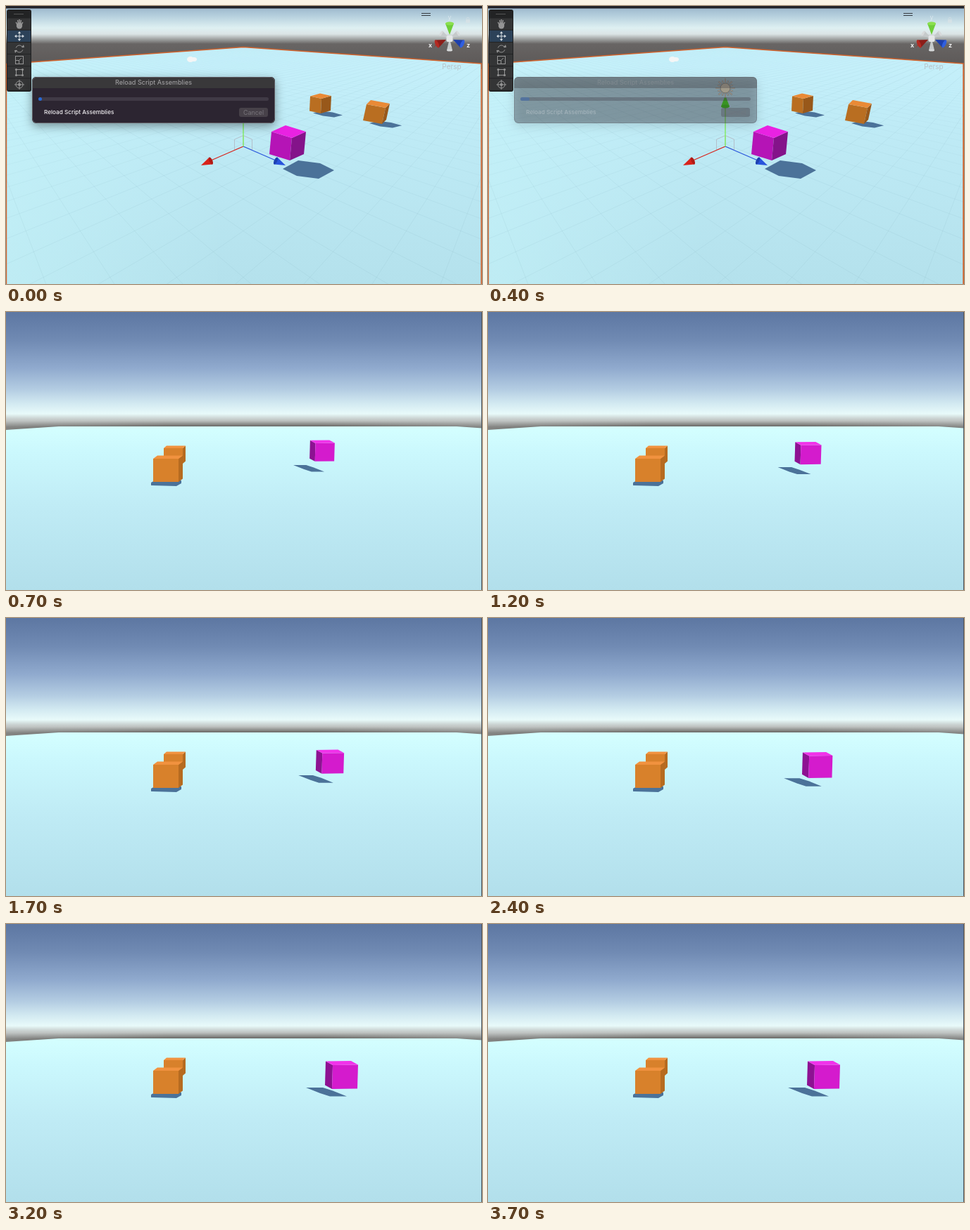
Recreate the animation shown at these times as an HTML page with a canvas. Size 676 px wide and 396 px high, loop 4.9 s.

```html
<!DOCTYPE html>
<html>
<head>
<meta charset="utf-8">
<style>
html, body { margin: 0; width: 100%; height: 100%; overflow: hidden; background: #b6e3ee; }
canvas { display: block; }
</style>
</head>
<body>
<canvas id="stage" width="676" height="396"></canvas>
<script>
const W = 676, H = 396, LOOP = 4900, STEP = 100;
const MID = 337;  // x of the handle and of the far ground corner
const SHADE = '#4b7299';
const g = document.getElementById('stage').getContext('2d');

// Points are [x, y] pairs.
const add = (p, q, s = 1) => [p[0] + q[0] * s, p[1] + q[1] * s];
const mix = (a, b, k) => a + (b - a) * k;

function path(points) {
  g.beginPath();
  for (const p of points) g.lineTo(...p);
}
function poly(color, points) { g.fillStyle = color; path(points); g.fill(); }
function line(color, width, ...points) {
  g.strokeStyle = color; g.lineWidth = width; path(points); g.stroke();
}
function box(color, x, y, w, h, r = 0) {
  g.fillStyle = color; g.beginPath(); g.roundRect(x, y, w, h, r); g.fill();
}
function disc(color, x, y, rx, ry = rx, turn = 0) {
  g.fillStyle = color; g.beginPath(); g.ellipse(x, y, rx, ry, turn, 0, 7); g.fill();
}
function ring(color, x, y, r, from = 0, to = 7) {
  g.strokeStyle = color; g.lineWidth = 1; g.beginPath(); g.arc(x, y, r, from, to); g.stroke();
}
function text(s, x, y, font, color, align = 'center') {
  g.font = font + ' Inter, sans-serif';
  g.fillStyle = color; g.textAlign = align; g.textBaseline = 'middle';
  g.fillText(s, x, y);
}
// Vertical gradient from [y, color] stops.
function fade(...stops) {
  const y0 = stops[0][0], y1 = stops[stops.length - 1][0];
  const f = g.createLinearGradient(0, y0, 0, y1);
  for (const [y, c] of stops) f.addColorStop((y - y0) / (y1 - y0), c);
  return f;
}

// Box seen from above: nearest top corner, edges to the right, left and down.
function cube([top, left, right], near, r, l, down, size = 1) {
  const at = (...edges) => edges.reduce((p, e) => add(p, e, size), near);
  poly(left, [near, at(l), at(l, down), at(down)]);
  poly(right, [near, at(r), at(r, down), at(down)]);
  poly(top, [near, at(l), at(l, r), at(r)]);
}
// A cube's shadow is the hexagon spanned by its three projected edges.
function shadow(start, edges, size = 1) {
  let p = start;
  const points = [];
  for (const s of [size, -size]) for (const e of edges) points.push(p = add(p, e, s));
  poly(SHADE, points);
}
function cone(color, cap, tip, base, r) {
  const turn = Math.atan2(base[1] - tip[1], base[0] - tip[0]);
  const side = [-Math.sin(turn) * r, Math.cos(turn) * r];
  poly(color, [tip, add(base, side), add(base, side, -1)]);
  disc(cap, ...base, r * 0.4, r, turn);
}

// Ground lines run to two vanishing points; their depth is evenly spaced.
function grid() {
  const horizon = 28, reach = 419;
  for (let d = 0.0009; d < 0.033; d += 0.00063) {
    const drop = 1 / d, color = `rgba(70,110,130,${Math.min(0.07, 0.0004 / d)})`;
    for (const side of [-1, 1]) {
      line(color, 1, [MID - side * reach, horizon], [MID + side * reach, horizon + 2 * drop]);
    }
  }
}

function toolbar() {
  const c = '#959595', lit = '#d5dce2';
  box('#222324', 1, 5, 35, 117, 3);
  line('#555', 1, [11, 11.5], [25, 11.5]);
  for (let i = 0; i < 6; i++) box(i == 1 ? '#2c4259' : '#343536', 2, 17.5 + i * 17.2, 33, 16.2, 1);
  // hand
  disc(c, 19, 28, 4.2, 4.5);
  for (let i = -2; i < 3; i++) line(c, 1.5, [19 + i, 29], [19 + i * 2.4, 19 + i * i]);
  // move
  for (let i = 0; i < 4; i++) {
    g.save(); g.translate(19, 43); g.rotate(i * Math.PI / 2);
    line(lit, 1, [0, 0], [5, 0]);
    poly(lit, [[7, 0], [4, -2.2], [4, 2.2]]);
    g.restore();
  }
  // rotate
  for (const turn of [0, Math.PI]) {
    g.save(); g.translate(19, 61); g.rotate(turn);
    ring(c, 0, 0, 5, 0.3, 2.8);
    poly(c, [[3, -2], [7, -2], [6, -6]]);
    g.restore();
  }
  // scale
  ring(c, 19, 112, 5);
  g.strokeRect(13.5, 71.5, 11, 11);
  g.strokeRect(13.5, 77.5, 5, 5);
  line(c, 1, [18, 78], [22, 74]);
  // rect
  g.strokeRect(14.5, 90.5, 9, 8);
  for (const x of [14.5, 23.5]) for (const y of [90.5, 98.5]) disc(c, x, y, 1.6);
  // transform
  line(c, 1, [12, 112], [26, 112]);
  line(c, 1, [19, 105], [19, 119]);
  disc(c, 19, 112, 2);
}

function compass() {
  const pale = 'rgba(220,226,230,.6)', hub = [630, 46];
  for (const y of [10.5, 13.5]) line('#34393f', 1, [590, y], [603, y]);
  box(pale, 653, 19, 6, 5, 1);
  ring(pale, 656, 18.5, 2, Math.PI, 2 * Math.PI);
  for (const x of [-12, 0, 12]) cone('#c6cacb', '#d7dadb', hub, add(hub, [x, x ? -7 : 17]), 4);
  cone('#6fce3a', '#8be04f', [630, 41], [630, 25], 6);
  cone('#b32a22', '#8c1d18', [607, 60], [614, 51], 1);
  cone('#8c1d18', '#b32a22', [625, 48], [612, 54], 6);
  cone('#1d40ad', '#2f5fe0', [635, 48], [648, 54], 6);
  box('#e4e6e7', 625.5, 42, 9, 9, 2);
  text('x', 602.5, 56, '600 9px', '#fff');
  text('z', 656.5, 56, '600 9px', '#fff');
  text('y', 630, 16, '9px', 'rgba(255,255,255,.45)');
  text('Persp', 633, 87, '10px', '#b9c4c8');
}

function moveHandle() {
  const origin = [MID, 200];
  for (const side of [-1, 1]) {
    const at = (x, y) => add(origin, [side * x, y]);
    const [color, cap] = side < 0 ? ['#d8231b', '#b01b15'] : ['#2854dc', '#1c40b0'];
    line('#b3bfca', 1, origin, at(12.5, 5), at(12.5, -10), at(0, -15.5), origin);
    line(color, 1.2, origin, at(46, 20));
    cone(color, cap, at(60, 27), at(46, 20.5), 5.5);
  }
  line('#86ef6a', 1.5, origin, [MID, 144]);
  cone('#4bea22', '#3fd01a', [MID, 127], [MID, 143], 6);
}

function sun() {
  for (let i = 0; i < 16; i++) {
    const a = i * Math.PI / 8, at = r => [MID + Math.cos(a) * r, 117 + Math.sin(a) * r];
    const end = at(i % 2 ? 11.5 : 13.5);
    line('#8b8b80', 2, at(8), end);
    line('#fffbe6', 1.2, at(8), end);
  }
  disc('#fdf5d3', MID, 117, 7);
  ring('#a39f8c', MID, 117, 7);
}

function editor() {
  const orange = ['#e98a36', '#b96e21', '#98581a'];
  const edge = [[0.5, H], [0.5, 82.5], [MID, 58.5], [675, 82], [675, H]];
  g.fillStyle = fade([0, '#98b4ca'], [14, '#b5cfdd'], [31, '#def0f2'], [40, '#dbe4e5'],
    [47, '#a2a5a4'], [54, '#686564'], [85, '#5c5857']);
  g.fillRect(0, 0, W, 90);
  box('#222329', 0, 0, W, 3.5);

  g.save();
  path(edge);
  g.clip();
  g.fillStyle = fade([58, '#c9f3fd'], [150, '#c0ecf7'], [H, '#b4e1ec']);
  g.fillRect(0, 0, W, H);
  const glow = g.createLinearGradient(0, 300, 300, 260);
  glow.addColorStop(0, 'rgba(200,246,251,.5)');
  glow.addColorStop(1, 'rgba(200,246,251,0)');
  g.fillStyle = glow;
  g.fillRect(0, 0, 300, H);
  grid();
  g.restore();
  line('#d0632d', 1.4, ...edge);

  // camera marker
  disc('#f4f6f6', 262, 76, 5, 4);
  disc('#f4f6f6', 267, 76, 4, 3);

  const cast = [[12, -3], [16, 2], [14, 4]];
  shadow([436, 152.5], cast);
  shadow([516, 167], cast, 1.1);
  shadow([393, 232], [[22, -12], [31, 4], [20, 10]]);
  cube(orange, [448, 132], [14, -4], [-16, -3.5], [-1, 21]);
  cube(orange, [539, 145], [6, -6], [-27, -5], [-5, 23]);
  cube(['#e922e2', '#b514b6', '#84138a'], [406, 188], [20, -9], [-29, -9], [-3, 32]);

  moveHandle();
  sun();
  toolbar();
  compass();
}

function dialog(t) {
  const name = 'Reload Script Assemblies';
  g.save();
  g.globalAlpha = Math.min(1, (500 - t) / 300);
  g.shadowColor = 'rgba(0,0,0,.4)';
  g.shadowBlur = 14;
  g.shadowOffsetY = 4;
  box('#2c2531', 37, 101, 345, 66, 6);
  g.shadowColor = 'transparent';
  box('#39383a', 37, 101, 345, 16, [6, 6, 0, 0]);
  g.strokeStyle = '#5f5c62'; g.lineWidth = 1;
  g.beginPath(); g.roundRect(37.5, 101.5, 344, 65, 6); g.stroke();
  text(name, 209.5, 109.5, '9.1px', '#a9a8aa');
  box('#403a46', 46, 130, 327, 5, 2.5);
  box('#2769d6', 46, 130, 5 + t / 50, 5, 2.5);
  text(name, 54, 152, '500 8.2px', '#f1eff2', 'left');
  box('#474149', 331, 145, 41, 13, 3);
  text('Cancel', 351.5, 152, '8.9px', '#79757c');
  g.restore();
}

// k runs from 0 to 1 while the magenta cube comes nearer.
function game(k) {
  const orange = ['#f1923f', '#d8812b', '#b66b20'];
  g.fillStyle = fade([0, '#5d77a2'], [40, '#708ab3'], [80, '#90aace'], [110, '#b3cce2'],
    [130, '#d2e9f1'], [145, '#e8fafa'], [155, '#bcc0be'], [164, '#5f5d5a'], [172, '#5f5d5a']);
  g.fillRect(0, 0, W, 172);
  // paler haze near both sides
  for (const x of [0, W]) {
    const haze = g.createLinearGradient(x, 0, x ? W - 230 : 230, 0);
    haze.addColorStop(0, 'rgba(200,206,206,.35)');
    haze.addColorStop(1, 'rgba(200,206,206,0)');
    g.fillStyle = haze;
    g.fillRect(0, 152, W, 16);
  }
  const ground = fade([163, '#d4ffff'], [200, '#cbf8fd'], [280, '#bfebf5'], [H, '#b2dfeb']);
  poly(ground, [[0, 168], [75, 163], [640, 163], [W, 165.5], [W, H], [0, H]]);

  cube(orange, [251, 194], [4, -3.5], [-27, 0], [0, 22]);
  shadow([206, 243], [[7, -4], [36, 1], [0, 4]]);
  cube(orange, [245, 209], [6, -4.5], [-36, 0], [0, 33]);

  const size = mix(0.76, 1, k);
  shadow([mix(408, 426, k), mix(218, 233, k)], [[24, 0], [14, 4.5], [20, 8]], size);
  cube(['#f132ea', '#8d1292', '#d41bcd'], [mix(439.5, 464, k), mix(187, 201, k)],
    [36, -0.5], [-10, -5.5], [-1, 34], size);
  box('#4a5560', 675, 0, 1, H);
}

function draw(now) {
  const t = Math.floor(now % LOOP / STEP) * STEP;
  if (t < 700) {
    editor();
    if (t < 500) dialog(t);
  } else {
    game(Math.min(1, (t - 700) / 2500));
  }
}

const start = performance.now();
function tick() {
  draw(performance.now() - start);
  requestAnimationFrame(tick);
}
tick();
</script>
</body>
</html>
```
